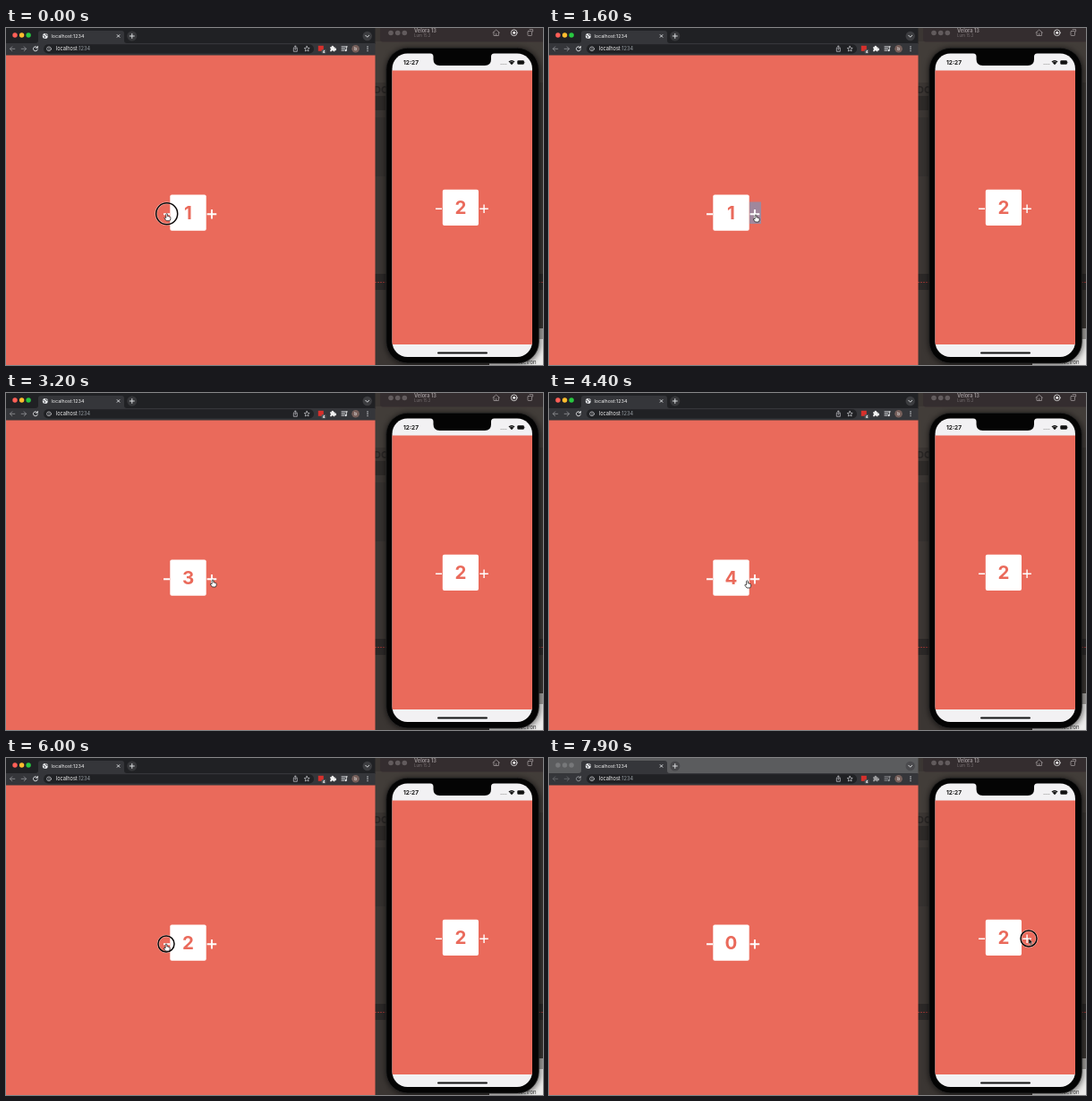
An HTML page that plays this animation: 600 px wide and 377 px high, repeating every 8 s.

```html
<!DOCTYPE html>
<html lang="en">
<head>
<meta charset="utf-8">
<title>Counter on two screens</title>
<style>
  html, body { margin: 0; width: 100%; height: 100%; overflow: hidden; background: #3b3633; }
  svg { display: block; width: 100vw; height: 100vh; font-family: Inter, Roboto, sans-serif; }
  .line { fill: none; stroke: #e8eaed; stroke-width: .9; stroke-linecap: round; stroke-linejoin: round; }
  .digit { font-weight: 700; font-size: 20.5px; text-anchor: middle; fill: #ea6a5b; }
  .coral { fill: #ea6a5b; }
  .strip { fill: #202124; }
  .away .strip { fill: #5b5c5e; }
  .away .light { fill: #77787a; }
  .away .dim { opacity: .55; }
</style>
</head>
<body>
<svg viewBox="0 0 600 377" preserveAspectRatio="none">
  <defs>
    <filter id="blur" x="-20%" y="-20%" width="140%" height="140%"><feGaussianBlur stdDeviation="3"/></filter>
    <clipPath id="screen"><rect x="431.5" y="28.5" width="156.5" height="339.5" rx="17"/></clipPath>
  </defs>

  <!-- desktop behind the phone -->
  <rect x="412" width="188" height="377" fill="#3b3633"/>
  <rect x="412" y="15" width="188" height="46" fill="#423d39"/>
  <rect x="412" y="76" width="12" height="16" fill="#2d2a28"/>
  <rect x="412" y="100" width="12" height="66" fill="#35312f"/>
  <text x="411" y="73" font-size="11" font-weight="700" fill="#282524">DO</text>
  <rect x="412" y="275" width="188" height="18" fill="#2b2827"/>
  <path d="M412 284.5H600" stroke="#8c3431" stroke-dasharray="2 1"/>
  <rect x="540" y="336" width="60" height="14" fill="#a5a2a0"/>
  <rect x="540" y="348" width="60" height="29" fill="#ecebea"/>
  <rect x="424" y="22" width="173" height="355" rx="25" fill="#000" opacity=".55" filter="url(#blur)"/>
  <text x="573" y="376" font-size="6" fill="#333">lectron</text>

  <!-- simulator title bar -->
  <path d="M418 0H600V15.5H421Q418 15.5 418 12.5Z" fill="#342d2f"/>
  <g fill="#625b5d"><circle cx="430" cy="5.5" r="2.8"/><circle cx="437.7" cy="5.5" r="2.8"/><circle cx="445.3" cy="5.5" r="2.8"/></g>
  <text x="456" y="5" font-size="5.6" font-weight="700" fill="#938c8e">Velora 13</text>
  <text x="456" y="10.3" font-size="4.4" fill="#766f71">Lum 15.2</text>
  <g class="line" style="stroke:#9d9798;stroke-width:.8">
    <path d="M544 5.2L547.7 2L551.4 5.2M545 4.6V8.5H550.4V4.6M547.7 8.5V6.3"/>
    <circle cx="567.7" cy="5.3" r="3.4" style="stroke:#eee"/>
    <rect x="583" y="3.5" width="4.5" height="5" rx=".6"/><path d="M585 1.6H588.6V4"/>
  </g>
  <circle cx="567.7" cy="5.3" r="1.5" fill="#eee"/>

  <!-- phone -->
  <rect x="424.8" y="22.3" width="170.5" height="352.7" rx="24" fill="#040404" stroke="#272626" stroke-width=".8"/>
  <g clip-path="url(#screen)">
    <rect x="431" y="28" width="158" height="341" fill="#f2f1f3"/>
    <rect class="coral" x="431" y="47.5" width="158" height="306.5"/>
  </g>
  <path d="M474 28H545.5Q542 28.8 542 32V35Q542 42 535 42H484.5Q477.5 42 477.5 35V32Q477.5 28.8 474 28Z" fill="#040404"/>
  <text x="444" y="41" font-size="6.5" font-weight="700" fill="#111">12:27</text>
  <path d="M552.5 40.5H559.5" stroke="#aaa" stroke-dasharray="1.2 .7"/>
  <path d="M561.5 37.6Q565 34.2 568.5 37.6L565 41.2Z" fill="#111"/>
  <path d="M562.2 38.7Q565 36.1 567.8 38.7" fill="none" stroke="#f2f1f3" stroke-width=".4"/>
  <rect x="571.3" y="36.3" width="7.6" height="4.4" rx="1.2" fill="#111"/>
  <path d="M579.6 37.8V39.2" stroke="#555" stroke-width=".6"/>
  <rect x="482" y="362.4" width="56" height="2" rx="1" fill="#111"/>
  <rect x="487.8" y="180.7" width="40.2" height="40.3" rx="2" fill="#fff"/>
  <text class="digit" x="507.9" y="208.3">2</text>
  <path d="M480 202.3H487M529.3 202.3H538.9M534.1 197.5V207.1" stroke="#fff" stroke-width="1.4"/>

  <!-- browser -->
  <g id="browser">
    <rect class="strip" width="412.5" height="18"/>
    <path d="M33 17Q36 17 36 14V6Q36 3 39 3H129Q132 3 132 6V14Q132 17 135 17H412.5V30.5H0V17Z" fill="#35363a"/>
    <circle class="light" cx="10" cy="8" r="2.7" fill="#ff5f57"/>
    <circle class="light" cx="17.6" cy="8" r="2.7" fill="#febc2e"/>
    <circle class="light" cx="25.1" cy="8" r="2.7" fill="#28c840"/>
    <circle cx="43.8" cy="9" r="3" fill="#e8eaed"/>
    <path d="M41.4 8.2L43.6 9.4L43 11.5M44.2 6.3L44.9 8L46.5 8.6" fill="none" stroke="#35363a" stroke-width=".9"/>
    <text x="50.5" y="11" font-size="5.4" fill="#f1f1f1">localhost:1234</text>
    <path class="line" d="M124.2 7.6L126.9 10.3M126.9 7.6L124.2 10.3"/>
    <circle class="dim" cx="140.8" cy="9" r="5.5" fill="#36373a"/>
    <path class="line" d="M138.3 9H143.3M140.8 6.5V11.5"/>
    <circle class="dim" cx="403.7" cy="9" r="5.2" fill="#3c3d40"/>
    <path class="line" d="M401.7 8.2L403.7 10.2L405.7 8.2"/>
    <rect x="42" y="18.2" width="302" height="10.3" rx="5.1" fill="#202124"/>
    <g class="line dim">
      <path d="M9.8 23.3H4.5M6.8 20.9L4.4 23.3L6.8 25.7" stroke="#8b8c8f"/>
      <path d="M17.2 23.3H22.5M20.2 20.9L22.6 23.3L20.2 25.7" stroke="#8b8c8f"/>
      <path d="M35 21.8A2.5 2.5 0 1 0 35.4 24M35.4 20.5V22.2H33.6"/>
    </g>
    <circle class="line" cx="48" cy="23.3" r="2.4" style="stroke-width:.6"/>
    <path class="line" d="M48 23.2V24.4M48 22V22.1" style="stroke-width:.6"/>
    <text x="55.8" y="25.3" font-size="5.6" fill="#f1f1f1">localhost<tspan fill="#9aa0a6">:1234</tspan></text>
    <g class="line" style="stroke:#c9cbcf;stroke-width:.7">
      <path d="M322.2 22.3H321.3V26.3H325.3V22.3H324.4M323.3 24.3V20M322.1 21.1L323.3 19.9L324.5 21.1"/>
      <path d="M336.2 20.3L337.1 22.3L339.2 22.5L337.6 23.9L338.1 26L336.2 24.9L334.3 26L334.8 23.9L333.2 22.5L335.3 22.3Z"/>
    </g>
    <rect x="348.8" y="19.8" width="6" height="6" fill="#d6302c"/>
    <rect x="352.6" y="24" width="4.8" height="4.6" rx=".8" fill="#55575b"/>
    <text x="353.7" y="27.8" font-size="4" font-weight="700" fill="#fff">4</text>
    <g class="dim">
      <path d="M362.2 21.3H363.7A1.2 1.2 0 1 1 366 21.3H367.4V22.8A1.2 1.2 0 1 1 367.4 25V26.3H365.9A1 1 0 0 0 363.8 26.3H362.2V24.7A1 1 0 0 0 362.2 22.8Z" fill="#f1f1f1"/>
      <path class="line" d="M375 20.9H380.5M375 23H378.5M375 25.1H377.6M380.3 25.2V20.9H381.4"/>
      <circle cx="379.5" cy="25.1" r="1.1" fill="#e8eaed"/>
    </g>
    <circle cx="390.6" cy="23.2" r="4.3" fill="#77605b"/>
    <text x="390.6" y="25" font-size="4.8" text-anchor="middle" fill="#fff">b</text>
    <g fill="#e8eaed"><circle cx="404" cy="21" r=".7"/><circle cx="404" cy="23.3" r=".7"/><circle cx="404" cy="25.6" r=".7"/></g>
    <rect class="coral" y="30.5" width="412.5" height="346.5"/>
    <rect id="select" x="224" y="194.5" width="13" height="24.5" fill="#a0879c"/>
    <rect x="183.3" y="186.4" width="40.4" height="40.4" rx="2" fill="#fff"/>
    <text id="count" class="digit" x="203.5" y="214.1">1</text>
    <path d="M176 208.2H183M224.6 208.2H235.2M229.9 202.9V213.5" stroke="#fff" stroke-width="1.9"/>
  </g>

  <!-- pointer -->
  <g id="pointer">
    <g id="ring" fill="none">
      <circle r="12" stroke="#fff" stroke-opacity=".55" stroke-width="2.6"/>
      <circle r="12" stroke="#0b0808" stroke-width="1.5"/>
    </g>
    <path id="hand" d="M-.9 .5Q0-.6 .9 .5V3Q2.2 2.5 2.5 3.4Q4.2 3.2 4.2 4.7Q4.4 6.3 3.2 8H-.5L-2.8 5Q-2.6 3.7-.9 4.7Z" fill="#fff" stroke="#222" stroke-width=".8" stroke-linejoin="round"/>
    <path id="arrow" d="M0 0V6.3L1.5 5L2.5 7.2L3.6 6.7L2.6 4.6H4.6Z" fill="#111" stroke="#eee" stroke-width=".45"/>
  </g>
</svg>
<script>
  const LOOP = 8000, STEP = 100;
  const el = id => document.getElementById(id);
  const show = (id, on) => { el(id).style.display = on ? "" : "none"; };

  // time, x, y of the pointer tip
  const path = [
    [0, 179.7, 207.7], [300, 179.7, 207.7], [900, 231, 209], [3600, 231, 209],
    [3700, 231.5, 209.3], [3800, 231.5, 209.3], [4400, 221.5, 210], [4800, 179, 208],
    [6800, 179, 208], [7300, 549, 224], [7700, 536, 202], [LOOP, 536, 202]
  ];
  // press and release times; the number changes on release
  const presses = [
    [-200, 200, -1], [1000, 1200, 1], [1700, 1900, 1], [2300, 2500, 1], [3300, 3500, 1],
    [5000, 5200, -1], [5400, 5700, -1], [5900, 6200, -1], [6500, 6700, -1], [7800, 8100, 0]
  ];

  function tipAt(t) {
    const i = path.findIndex(p => p[0] > t);
    const [t0, x0, y0] = path[i - 1], [t1, x1, y1] = path[i];
    const u = (t - t0) / (t1 - t0), k = u * u * (3 - 2 * u);
    return [x0 + (x1 - x0) * k, y0 + (y1 - y0) * k];
  }

  function draw(t) {
    const [x, y] = tipAt(t);
    const press = presses.find(([down, up]) => t >= down && t < up);
    const value = presses.reduce((n, [, up, change]) => t >= up ? n + change : n, 1);
    el("count").textContent = value;
    el("pointer").setAttribute("transform", `translate(${x} ${y})`);
    show("ring", press);
    if (press) {
      const r = Math.min(12, 6 + (t - press[0]) * .03);
      for (const c of el("ring").children) c.setAttribute("r", r);
    }
    const overCounter = x > 170 && x < 240;
    show("hand", overCounter);
    show("arrow", !overCounter);
    show("select", t >= 1500 && t < 2300);
    el("browser").classList.toggle("away", t >= 7800);
  }

  const start = performance.now();
  function tick() {
    const t = (performance.now() - start) % LOOP;
    draw(Math.floor(t / STEP) * STEP);
    requestAnimationFrame(tick);
  }
  tick();
</script>
</body>
</html>
```
